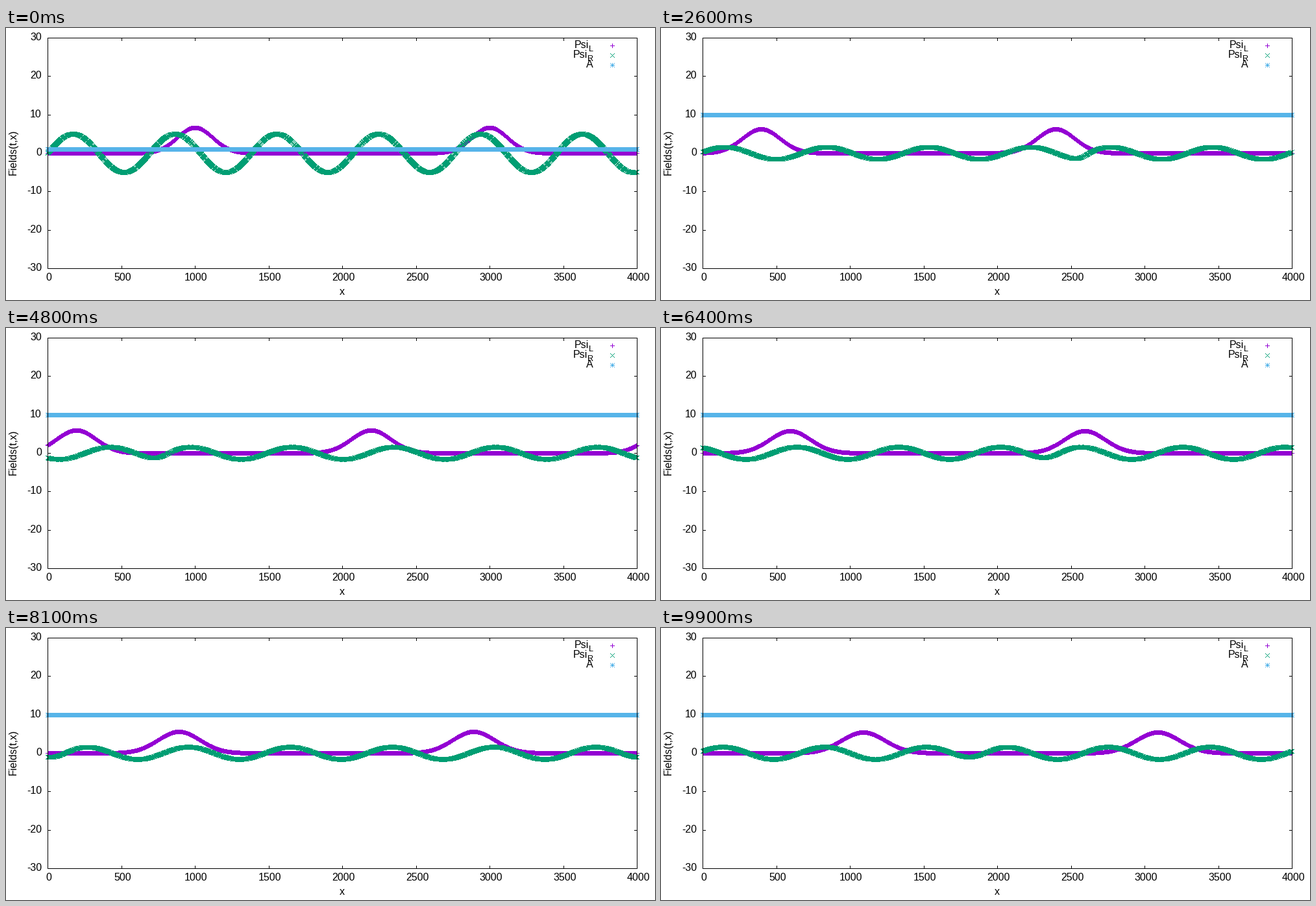
A matplotlib script for the animation above (10 s loop, 1000x420 px).

```python
import numpy as np
import matplotlib.pyplot as plt
from matplotlib.animation import FuncAnimation

W, H, FRAMES = 1000, 420, 100
LEFT, RIGHT, TOP, BOTTOM = 64, 972, 15, 371
TICK = 5
PURPLE, GREEN, BLUE = (148, 0, 211), (0, 158, 115), (86, 180, 233)
BLACK = (0, 0, 0, 255)

# 7 px point symbols as pixel offsets
R7 = range(-3, 4)
PLUS = [(d, 0) for d in R7] + [(0, d) for d in R7]
CROSS = [(d, d) for d in R7] + [(d, -d) for d in R7]
STAR = PLUS + CROSS
STYLES = [(PLUS, PURPLE), (CROSS, GREEN), (STAR, BLUE)]

# Initial fields on a periodic grid
N = 4000
x = np.arange(N)
q = 2 * np.pi * np.fft.rfftfreq(N)
SIGMA = 120
left0 = sum(np.exp(-((x - c) / SIGMA) ** 2 / 2) for c in (1000, 3000))
left0 *= 2000 / (SIGMA * np.sqrt(2 * np.pi))
right0 = np.sin(x / 110)


def to_px(v):
    return np.floor(LEFT + v * (RIGHT - LEFT) / 4000 + 0.5).astype(int)


def to_py(v):
    return np.floor(BOTTOM - (v + 30) * (BOTTOM - TOP) / 60 + 0.5).astype(int)


def rms(f):
    return np.sqrt(np.mean(f ** 2))


def advect(f, shift, var):
    """Move f along the periodic axis and smear it by a Gaussian."""
    kernel = np.exp(-1j * q * shift - q ** 2 * var / 2)
    return np.fft.irfft(np.fft.rfft(f) * kernel, N)


def fields(n):
    if n == 0:
        return left0, 5 * right0, np.ones(N)
    var = 75 * n
    left = advect(left0, -100.1 * n, var)
    right = advect(right0, 99.9 * n, var)
    right *= 1.584 * rms(right0) / rms(right)
    return left, right, np.full(N, 10.0)


x_ticks = np.arange(0, 4001, 500)
y_ticks = np.arange(-30, 31, 10)
columns = to_px(x)


def stamp(img, px, py, symbol, color):
    for dx, dy in symbol:
        img[py + dy, px + dx] = (*color, 255)


def draw_ticks(img):
    for px in to_px(x_ticks):
        img[TOP:TOP + TICK, px] = BLACK
        img[BOTTOM - TICK + 1:BOTTOM + 1, px] = BLACK
    for py in to_py(y_ticks):
        img[py, LEFT:LEFT + TICK] = BLACK
        img[py, RIGHT - TICK + 1:RIGHT + 1] = BLACK


def draw_border(img):
    img[[TOP, BOTTOM], LEFT:RIGHT + 1] = BLACK
    img[TOP:BOTTOM + 1, [LEFT, RIGHT]] = BLACK


def render(n):
    img = np.full((H, W, 4), 255, np.uint8)
    draw_ticks(img)
    for i, (values, style) in enumerate(zip(fields(n), STYLES)):
        stamp(img, columns, to_py(values), *style)
        stamp(img, 934, 27 + 15 * i, *style)
    draw_border(img)
    return img


plt.rcParams["font.family"] = "Liberation Sans"
fig = plt.figure(figsize=(10, 4.2), dpi=100, facecolor="white")
ax = fig.add_axes([0, 0, 1, 1])
ax.axis("off")
picture = ax.imshow(render(0), extent=(0, W, H, 0), interpolation="nearest",
                    aspect="auto")
ax.set_xlim(0, W)
ax.set_ylim(H, 0)


def label(px, py, s, size=16, **kw):
    ax.text(px, py, s, fontsize=size * 0.72, color="black",
            va="baseline", **kw)


for v, px in zip(x_ticks, to_px(x_ticks)):
    label(px + 2, 390, str(v), ha="center")
for v, py in zip(y_ticks, to_py(y_ticks)):
    label(55, py + 4, str(v), ha="right")

label(518, 412, "x", ha="center")
label(16, 192, "Fields(t,x)", ha="center", rotation=90,
      rotation_mode="anchor")

for base, sub, split in ((31, "L", 898), (46, "R", 896)):
    label(split, base, "Psi", ha="right")
    label(split, base + 5, sub, 12.8, ha="left")
label(905, 61, "A", ha="right")


def update(n):
    picture.set_data(render(n))
    return [picture]


anim = FuncAnimation(fig, update, frames=FRAMES, interval=100,
                     repeat=True, repeat_delay=0)
plt.show()
```
